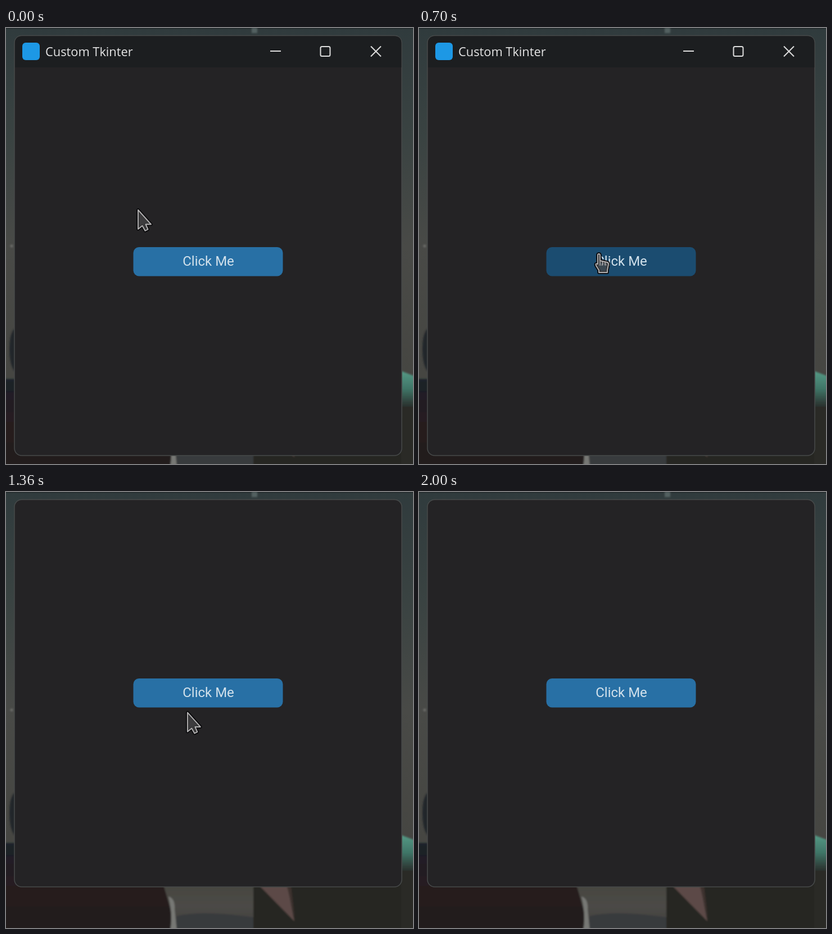
Recreate the animation shown at these times as an HTML page. Size 724 by 774 pixels, loop 2.03 s.

```html
<!DOCTYPE html>
<html lang="en">
<head>
<meta charset="utf-8">
<title>Button click</title>
<style>
  html, body { margin: 0; width: 100%; height: 100%; overflow: hidden; background: #242325; }
  svg { display: block; width: 724px; height: 774px; }
  .pointer path { stroke-linejoin: round; stroke-linecap: round; }
  .rim { fill: none; stroke: #09090b; stroke-width: 5.5; }
  .body { fill: #454547; fill-opacity: .75; stroke: #b3b1b2; stroke-width: 1.9; }
</style>
</head>
<body>
<svg viewBox="0 0 724 774">
  <defs>
    <linearGradient id="wall" x2="0" y2="1">
      <stop stop-color="#303b3d"/>
      <stop offset=".25" stop-color="#3a4342"/>
      <stop offset=".5" stop-color="#494a47"/>
      <stop offset=".8" stop-color="#464642"/>
      <stop offset="1" stop-color="#403f3c"/>
    </linearGradient>
    <linearGradient id="coat" x2="0" y2="1">
      <stop stop-color="#1c2029"/>
      <stop offset=".5" stop-color="#271d1f"/>
      <stop offset="1" stop-color="#211b1d"/>
    </linearGradient>
    <linearGradient id="glow" x2="0" y2="1">
      <stop stop-color="#559985"/>
      <stop offset=".5" stop-color="#3f7567"/>
      <stop offset="1" stop-color="#2a302d"/>
    </linearGradient>
    <linearGradient id="floor" x2="0" y2="1">
      <stop stop-color="#44443f"/>
      <stop offset=".5" stop-color="#4c4a46"/>
      <stop offset="1" stop-color="#3b3b3c"/>
    </linearGradient>
    <filter id="soft"><feGaussianBlur stdDeviation="1.5"/></filter>
  </defs>

  <!-- Backdrop -->
  <rect width="724" height="774" fill="url(#wall)"/>
  <rect width="724" height="1.5" fill="#222a2c"/>
  <g filter="url(#soft)">
    <path d="M437 0h10v9h-10z" fill="#536060"/>
    <circle cx="10" cy="387" r="2.5" fill="#6b6c69"/>
    <path d="M16 533Q6 541 6 570T16 610Z" fill="#24272b"/>
    <path d="M-4 623H270L296 705L300 780H-4Z" fill="url(#coat)"/>
    <path d="M278 690H450V780H304Z" fill="url(#floor)"/>
    <path d="M303 753Q350 742 440 755V780H303Z" fill="#393a3c"/>
    <path d="M289 718Q301 722 300 740L304 780H292Q297 750 289 718Z" fill="#777875"/>
    <path d="M440 690H730V780H440Z" fill="#272623"/>
    <path d="M703 650H730V780H703Z" fill="#292a28"/>
    <path d="M703 609L730 619V672H703Z" fill="url(#glow)"/>
    <path d="M452 700H501L513 762Z" fill="#5b4946"/>
    <path d="M500 700H507L514 758Z" fill="#3c322f"/>
  </g>

  <!-- Window -->
  <rect id="frame" x="15" y="13.5" width="689" rx="13" fill="#242325" stroke="#474a4a" stroke-width="1.5"/>
  <g id="bar">
    <path d="M16 70V27Q16 14.500 28.500 14.500H691Q703.300 14.500 703.300 27V70Z" fill="#1c1e20"/>
    <rect x="29" y="26" width="31" height="31" rx="6" fill="#1d98e5"/>
    <text x="70" y="50" font-family="'Open Sans', 'Noto Sans', sans-serif" font-size="21.800" fill="#e6e6e6">Custom Tkinter</text>
    <g fill="none" stroke="#dedede" stroke-width="2">
      <path d="M470 41H489M649 32.500L667 50.500M667 32.500L649 50.500"/>
      <rect x="559.500" y="33" width="17" height="17" rx="2.500"/>
    </g>
  </g>
  <g id="button">
    <rect id="face" x="226.500" y="389" width="266" height="51.500" rx="10"/>
    <text x="360" y="422" text-anchor="middle" font-family="Roboto, sans-serif" font-size="24" fill="#d3e2ec">Click Me</text>
  </g>

  <!-- Pointers, with the hot spot at the origin -->
  <g id="arrow" class="pointer">
    <path id="arrowLine" class="rim" d="M0 1V35L7.500 29L12.500 38L17.500 35.500L13.500 26.500H23Z"/>
    <path class="body" d="M0 1V35L7.500 29L12.500 38L17.500 35.500L13.500 26.500H23Z"/>
  </g>
  <g id="hand" class="pointer">
    <path class="rim" d="M-4 0Q-4 -2 -2 -2T0 0V10L13 13Q15.500 14 15 17L13 27V31H-2V27L-7 19Q-9 14 -4 16Z"/>
    <path class="body" d="M-4 0Q-4 -2 -2 -2T0 0V10L13 13Q15.500 14 15 17L13 27V31H-2V27L-7 19Q-9 14 -4 16Z"/>
    <path d="M0 10V17M4.500 11V18M9 12V18" fill="none" stroke="#b3b1b2" stroke-width="1.500"/>
  </g>
</svg>
<script>
  const LOOP = 2030, STEP = 30, CLICK = 730, RELEASE = 820;
  const el = id => document.getElementById(id);
  const show = (id, on) => el(id).style.display = on ? "" : "none";
  const clamp = v => Math.max(0, Math.min(1, v));

  function pointerAt(t) {
    const glide = (1 - Math.cos(Math.PI * clamp((t - 30) / 490))) / 2;
    const flick = Math.max(0, (t - 1180) / 430) ** 3;
    return [235 + 87 * glide + 14 * flick, 322 + 81 * glide - 203 * flick];
  }

  function draw(now) {
    const t = Math.floor(now % LOOP / STEP) * STEP;
    const [x, y] = pointerAt(t);
    const bare = t >= CLICK;
    const lift = bare ? 58 : 0;
    const hover = y >= 389 - lift && y <= 440 - lift;
    const hand = hover || (bare && t < RELEASE);

    el("frame").setAttribute("height", 745.5 - lift);
    el("button").setAttribute("transform", `translate(0 ${-lift})`);
    el("face").setAttribute("fill", hover ? "#1b4c70" : "#2870a5");
    show("bar", !bare);
    show("hand", hand);
    show("arrow", !hand);
    el(hand ? "hand" : "arrow").setAttribute("transform", `translate(${x} ${y})`);
  }

  const start = performance.now();
  function tick() {
    draw(performance.now() - start);
    requestAnimationFrame(tick);
  }
  tick();
</script>
</body>
</html>
```
